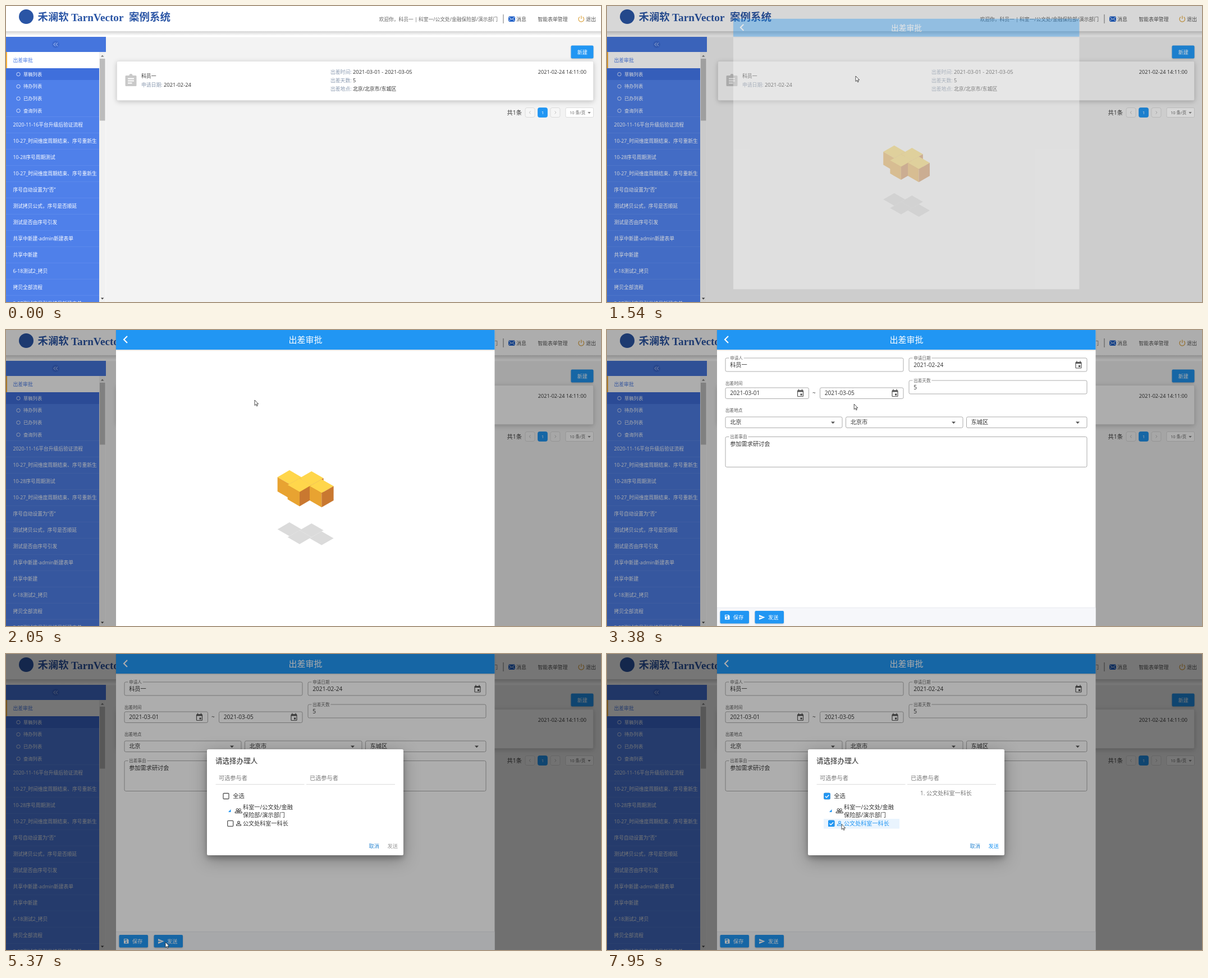
Write an HTML page that moves like this. It is 1060 by 528 pixels and loops after 8000 ms.

```html
<!DOCTYPE html>
<html lang="zh-CN">
<head>
<meta charset="utf-8">
<title>出差审批</title>
<style>
html, body { margin: 0; width: 100%; height: 100%; overflow: hidden; background: #fff; }
svg { display: block; width: 1060px; height: 528px; font-family: 'Open Sans', 'Noto Sans CJK SC', 'Noto Sans CJK', sans-serif; }
text { white-space: pre; }
.brand { font-family: 'Liberation Serif', 'Noto Sans CJK SC', serif; font-weight: 700; }
.lift { filter: drop-shadow(0 2px 4px rgba(0,0,0,.2)); }
.edge { filter: drop-shadow(0 1px 1px rgba(0,0,0,.2)); }
.modal { filter: drop-shadow(0 5px 5px rgba(0,0,0,.22)) drop-shadow(0 7px 14px rgba(0,0,0,.3)); }
</style>
</head>
<body>
<svg id="stage" viewBox="0 0 1060 528"></svg>
<script>
const LOOP = 8000, BLUE = '#2196f3', INK = '#333', SHADE = 0.32;

// Markup helpers
const text = (x, y, s, size = 8.8, fill = INK, attrs = '') =>
  `<text x="${x}" y="${y}" font-size="${size}" fill="${fill}" ${attrs}>${s}</text>`;
const rect = (x, y, w, h, fill, r = 0, attrs = '') =>
  `<rect x="${x}" y="${y}" width="${w}" height="${h}" rx="${r}" fill="${fill}" ${attrs}/>`;
const path = (d, fill, attrs = '') => `<path d="${d}" fill="${fill}" ${attrs}/>`;
const line = (d, stroke, width = 1, attrs = '') => path(d, 'none', `stroke="${stroke}" stroke-width="${width}" ${attrs}`);
const circle = (x, y, r, fill, attrs = '') => `<circle cx="${x}" cy="${y}" r="${r}" fill="${fill}" ${attrs}/>`;
const group = (attrs, ...parts) => `<g ${attrs}>${parts.join('')}</g>`;
const at = (x, y, ...parts) => group(`transform="translate(${x} ${y})"`, ...parts);
const middle = 'text-anchor="middle"';

function header() {
  return [
    rect(0, 0, 1060, 55, '#fff'),
    rect(0, 45, 1060, 8, 'url(#fade)'),
    rect(0, 0, 1060, 45, '#fff'),
    circle(36, 19, 13, '#2a55a5'),
    group('class="brand"',
      text(56.5, 26, '禾澜软', 18.4, '#2a55a5'),
      text(116, 26.5, 'TarnVector', 19.2, '#2a55a5'),
      text(219, 26, '案例系统', 18.5, '#2a55a5')),
    text(664.5, 27, '欢迎你，科员一 | 科室一/公文处/金融保险部/演示部门', 8.75, '#666'),
    line('M886 15v16', '#777'),
    rect(895, 18.5, 12, 9.5, '#2463c9', 1),
    line('M895 19l6 5 6-5M895 28l4-4.5M907 28l-4-4.5', '#fff', 0.9),
    text(909, 27, '消息', 9, '#555'),
    text(947.5, 27, '智能表单管理', 8.85, '#555'),
    line('M1022 19.5a4.8 4.8 0 1 0 5.6 0M1024.8 17.5v5.5', '#dba23c', 1.2),
    text(1033, 27, '退出', 9, '#555')
  ].join('');
}

function sidebar() {
  const sub = ['草稿列表', '待办列表', '已办列表', '查询列表'];
  const items = ['2020-11-16平台升级后验证流程', '10-27_时间维度周期结束、序号重新生', '10-28序号周期测试',
    '10-27_时间维度周期结束、序号重新生', '序号自动设置为“否”', '测试拷贝公式，序号是否顺延', '测试是否由序号引发',
    '共享中新建-admin新建表单', '共享中新建', '6-18测试2_拷贝', '拷贝全部流程', '5-27测试序号引发拷贝新建表单'];
  return [
    rect(0, 55, 166, 473, '#4f80ea'),
    rect(0, 55, 178, 27, '#4575dd'),
    circle(88.5, 68.5, 6.5, '#3b69cf'),
    line('M88 65.5l-3 3 3 3M92 65.5l-3 3 3 3', '#dbe6ff', 0.9),
    rect(0, 82, 166, 29, '#fff'), rect(0, 82, 1.8, 29, '#f5a623'),
    text(12.5, 100, '出差审批', 8.8, '#4a7be6'),
    rect(0, 111, 166, 21, '#3f6fdc'),
    ...sub.map((s, i) => circle(22, 121.7 + i * 21.7, 3.2, 'none', 'stroke="#dfe8ff" stroke-width=".9"') +
      text(31, 124.5 + i * 21.7, s, 8.3, '#fff')),
    ...items.map((s, i) => line(`M0 ${197.5 + i * 28.98}h166`, '#638ff0', 0.7) +
      text(12.5, 215.3 + i * 28.98, s, 8.75, '#fff')),
    rect(166, 82, 11.5, 446, '#f1f1f1'), rect(167, 94, 9.5, 110.5, '#bcbcbc'),
    path('M169 90.5l2.7-3 2.7 3z', '#777'), path('M169 520.5l2.7 3 2.7-3z', '#444')
  ].join('');
}

function listPage() {
  const label = (x, y, s) => text(x, y, s, 8.8, '#8a9ab0');
  const pageBox = (x, fill, stroke) => rect(x, 181.5, 17, 17, fill, 3, `stroke="${stroke}" stroke-width=".8"`);
  return [
    rect(178, 55.5, 882, 473, '#f3f3f3'),
    rect(1006.5, 70.5, 40, 23, BLUE, 2, 'class="edge"'),
    text(1026.7, 85.5, '新建', 9, '#fff', middle),
    rect(197.5, 98.5, 849, 70, '#fff', 2, 'stroke="#dcdcdc" stroke-width=".7" class="lift"'),
    path('M214 124h5.5a3 3 0 0 1 6 0h5.5q1.5 0 1.5 1.5v16q0 1.5-1.5 1.5h-17q-1.5 0-1.5-1.5v-16q0-1.5 1.5-1.5z', '#c9c9c9'),
    line('M217 129.5h11M217 133.5h11M217 137.5h7.5', '#fff', 2),
    text(241, 127.5, '科员一', 8.9),
    label(241, 144, '申请日期:'), text(281, 144, '2021-02-24', 9.4),
    label(578, 120.7, '出差时间:'), text(618, 120.7, '2021-03-01 - 2021-03-05', 9.4),
    label(578, 135.7, '出差天数:'), text(618, 135.7, '5', 9.2),
    label(578, 150.7, '出差地点:'), text(618, 150.7, '北京/北京市/东城区', 8.85),
    text(1034, 120.7, '2021-02-24 14:11:00', 9.15, INK, 'text-anchor="end"'),
    text(892.5, 193.7, '共1条', 10.3, '#333'),
    pageBox(925, '#f6f6f6', '#d5d5d5'), pageBox(947.5, BLUE, BLUE), pageBox(970, '#f6f6f6', '#d5d5d5'),
    line('M934.5 187.5l-2.2 2.5 2.2 2.5M977.7 187.5l2.2 2.5-2.2 2.5', '#bbb', 0.9),
    text(956, 193, '1', 8, '#fff', middle),
    rect(997, 181.5, 49.5, 17, '#fff', 2, 'stroke="#d5d5d5" stroke-width=".8"'),
    text(1004, 193.2, '10 条/页', 7.5, '#666'),
    path('M1036.3 189h5.4l-2.7 3.2z', '#888')
  ].join('');
}

const calendar = (x, y) => at(x, y,
  rect(-5, -4.5, 10, 10.5, 'none', 1, 'stroke="#555" stroke-width="1.2"'),
  rect(-5, -5, 10, 3, '#555'), rect(0, 1, 3.2, 3.2, '#555'), line('M-3 -7v3M3 -7v3', '#555', 1.2));

function field(x, y, w, h, value, { label, icon, baseline = 16 } = {}) {
  return rect(x, y, w, h, 'none', 2.5, 'stroke="#a3a3a3" stroke-width=".9"') +
    (label ? rect(x + 6.5, y - 2, label.length * 7.6 + 3.5, 4, '#fff') + text(x + 8.2, y + 2.6, label, 7.6, '#666') : '') +
    text(x + 8.2, y + baseline, value, 10.2) + (icon || '');
}

function form() {
  const dropdown = (x, w, s) => field(x, 155, w, 19.5, s,
    { baseline: 13.3, icon: path(`M${x + w - 20} 163.5h7l-3.5 3.7z`, '#555') });
  const day = (x, s) => field(x, 103, 148.5, 19.5, s, { baseline: 13.3, icon: calendar(x + 133.5, 112.5) });
  return [
    field(211, 50, 317, 24, '科员一', { label: '申请人' }),
    field(538, 50, 317, 24, '2021-02-24', { label: '申请日期', icon: calendar(840, 62) }),
    text(211, 97.5, '出差时间', 7.6, '#555'),
    day(211, '2021-03-01'), text(366, 116, '~', 10, '#444'), day(379.5, '2021-03-05'),
    field(538, 90, 317, 24, '5', { label: '出差天数' }),
    text(211, 146, '出差地点', 7.6, '#555'),
    dropdown(211, 208, '北京'), dropdown(425.5, 208.5, '北京市'), dropdown(640.5, 214.5, '东城区'),
    field(211, 190.5, 644, 54, '参加需求研讨会', { label: '出差事由' }),
    rect(196, 495.5, 674.5, 33, '#f6f7fa'), line('M196 495.5h674.5', '#e2e5ec', 0.8),
    group('id="active"', buttons(BLUE, '#fff', 'class="edge"')),
    group('id="disabled"', buttons('#d6d6d6', '#9b9b9b'))
  ].join('');
}

function buttons(fill, ink, attrs = '') {
  return rect(201.5, 501, 51.5, 22.5, fill, 2, attrs) + rect(263.5, 501, 51.5, 22.5, fill, 2, attrs) +
    path('M210 508h6.5l2 2v6.5h-8.5z', ink) + rect(211, 509, 4.5, 2, fill) + circle(214.2, 514, 1.4, fill) +
    path('M271 508l10.5 4.5-10.5 4.5v-3.5l7-1-7-1z', ink) +
    text(225, 516, '保存', 9.2, ink) + text(287, 516, '发送', 9.2, ink);
}

const person = (x, y) => circle(x, y - 2.3, 1.9, 'none') + path(`M${x - 4} ${y + 3.5}v-1q0-2 4-2t4 2v1z`, 'none');

function checkbox(name, x, y) {
  return rect(x, y, 10, 10, '#fff', 1.3, 'stroke="#555" stroke-width="1.3"') +
    group(`id="${name}"`, rect(x - 0.7, y - 0.7, 11.4, 11.4, BLUE, 1.5),
      line(`M${x + 1.8} ${y + 5.2}l2.3 2.3 4.3-4.6`, '#fff', 1.4));
}

function picker() {
  return [
    rect(358, 170, 350, 189, '#fff', 2.5, 'class="modal"'),
    text(373, 194.5, '请选择办理人', 12.55, '#222'),
    text(379, 224.5, '可选参与者', 10.2, '#777'), text(541, 224.5, '已选参与者', 10.2, '#777'),
    line('M373.5 232.5h158M535 232.5h158', '#d9d9d9', 0.9),
    rect(386, 294, 135, 17.5, '#e9f4fe', 0, 'id="row"'),
    checkbox('allChecked', 387, 248.5), text(404.3, 257.3, '全选', 10.3),
    path('M400.5 277v5h-4.5z', BLUE),
    group('stroke="#333" stroke-width="1"', person(412, 280), person(416.5, 280)),
    text(422, 276.7, '科室一/公文处/金融', 10.2), text(422, 290.7, '保险部/演示部门', 10.2),
    checkbox('oneChecked', 394.7, 297.3),
    group('id="personIcon" stroke-width="1.1"', person(414.5, 302.5)),
    text(422, 306, '公文处科室一科长', 10.1, INK, 'id="personName"'),
    text(558, 252.3, '1. 公文处科室一科长', 10.1, '#777', 'id="chosen"'),
    text(646.5, 346.2, '取消', 9.2, '#2a86d1'), text(679.5, 346.2, '发送', 9.2, '#999', 'id="confirm"')
  ].join('');
}

document.getElementById('stage').innerHTML = [
  `<defs><linearGradient id="fade" x2="0" y2="1"><stop stop-color="#000" stop-opacity=".17"/>
   <stop offset="1" stop-color="#000" stop-opacity="0"/></linearGradient></defs>`,
  listPage(), header(), sidebar(),
  rect(0, 0, 1060, 528, '#000', 0, 'id="shade1"'),
  group('id="sheet"',
    rect(196, 0, 674.5, 528, '#fff'), group('id="loader"'), group('id="form"', form()),
    rect(196, 0, 674.5, 35, BLUE, 0, 'class="edge"'),
    line('M216 11l-6 6 6 6', '#fff', 2.1),
    text(533.5, 23, '出差审批', 15, '#fff', middle + ' font-weight="500"')),
  rect(0, 0, 1060, 528, '#000', 0, 'id="shade2"'),
  group('id="picker"', picker()),
  group('id="status"', rect(711.5, 512.5, 350, 17, '#e3e6ea', 2, 'stroke="#c4c7cb" stroke-width=".8"'),
    text(715, 524, '正在等待 198.51.100.207 的响应...', 8.45, '#444')),
  group('id="cursor"', path('M0 0v9.5l2.2-2 1.5 3.3 1.5-.7-1.5-3.2h3z', '#fff', 'stroke="#222" stroke-width=".8"'))
].join('');

const el = Object.fromEntries([...document.querySelectorAll('[id]')].map(node => [node.id, node]));
const clamp = v => Math.max(0, Math.min(1, v));
const ramp = (t, from, to) => clamp((t - from) / (to - from));
const smooth = v => v * v * (3 - 2 * v);
const show = (node, visible) => node.setAttribute('visibility', visible ? 'inherit' : 'hidden');
const fade = (node, v) => { node.setAttribute('opacity', v); show(node, v > 0); };

// Four blocks circling on an isometric grid
function loaderMarkup(t) {
  const phase = (((0.36 + (t - 1640) / 573) % 1) + 1) % 1;
  const q = Math.min(1, phase * 2), r = Math.max(0, phase * 2 - 1);
  const W = 21.3, H = 12.3, D = 25.5;
  const cells = [[1 + r, 0], [r, 1 - q], [1 - r, 1], [2 - r, q]].sort((a, b) => a[0] + a[1] - b[0] - b[1]);
  const screen = ([x, y]) => [523 + (x - y) * W, 252 + (x + y) * H];
  const diamond = (x, y, fill) => path(`M${x} ${y - H}l${W} ${H} ${-W} ${H} ${-W} ${-H}z`, fill);
  const spots = cells.map(screen);
  return spots.map(([x, y]) => diamond(x, y + 93, '#dbdbdb')).join('') +
    spots.map(([x, y]) => diamond(x, y, '#ffd64b') +
      path(`M${x - W} ${y}l${W} ${H}v${D}l${-W} ${-H}z`, '#e8a331') +
      path(`M${x + W} ${y}l${-W} ${H}v${D}l${W} ${-H}z`, '#c97830')).join('');
}

// Cursor legs: start, end, from, to
const legs = [
  [180, 180, [1042, 517], [1042, 517]],
  [550, 1330, [1050, 519], [443, 125]],
  [3320, 4080, [443, 125], [288, 515]],
  [5290, 5370, [288, 515], [284, 514]],
  [5400, 6150, [284, 514], [418, 303.5]]
];

function placeCursor(t) {
  const leg = legs.filter(l => l[0] <= t).pop();
  show(el.cursor, leg && !(t >= 340 && t < 550));
  if (!leg) return;
  const [start, end, a, b] = leg, k = end > start ? smooth(ramp(t, start, end)) : 1;
  el.cursor.setAttribute('transform', `translate(${a[0] + (b[0] - a[0]) * k} ${a[1] + (b[1] - a[1]) * k})`);
}

function render(t) {
  const open = ramp(t, 1425, 1735), scale = 1 - 0.22 * (1 - open) ** 2;
  fade(el.shade1, SHADE * Math.min(1, open * 1.3));
  fade(el.sheet, open);
  el.sheet.setAttribute('transform', `translate(533 264) scale(${scale}) translate(-533 -264)`);

  const loading = t < 2800;
  show(el.loader, loading);
  if (loading && open) el.loader.innerHTML = loaderMarkup(t < 2400 ? Math.min(t, 2140) : t - 260);
  fade(el.form, ramp(t, 2780, 2880));

  const sending = t >= 4100 && t < 4700;
  show(el.active, !sending);
  show(el.disabled, sending);
  show(el.status, t >= 4170 && t < 4780);

  const ask = ramp(t, 4502, 4740);
  fade(el.shade2, SHADE * ask);
  fade(el.picker, ask);

  const hover = t >= 6310, checked = t >= 6920, settled = t >= 7160;
  const nameColor = hover ? BLUE : INK;
  el.personName.setAttribute('fill', nameColor);
  el.personIcon.setAttribute('stroke', nameColor);
  show(el.oneChecked, checked);
  show(el.chosen, checked);
  show(el.allChecked, settled);
  show(el.row, settled);
  el.confirm.setAttribute('fill', settled ? BLUE : '#999');
  placeCursor(t);
}

function tick() {
  render(performance.now() % LOOP);
  requestAnimationFrame(tick);
}
tick();
</script>
</body>
</html>
```
